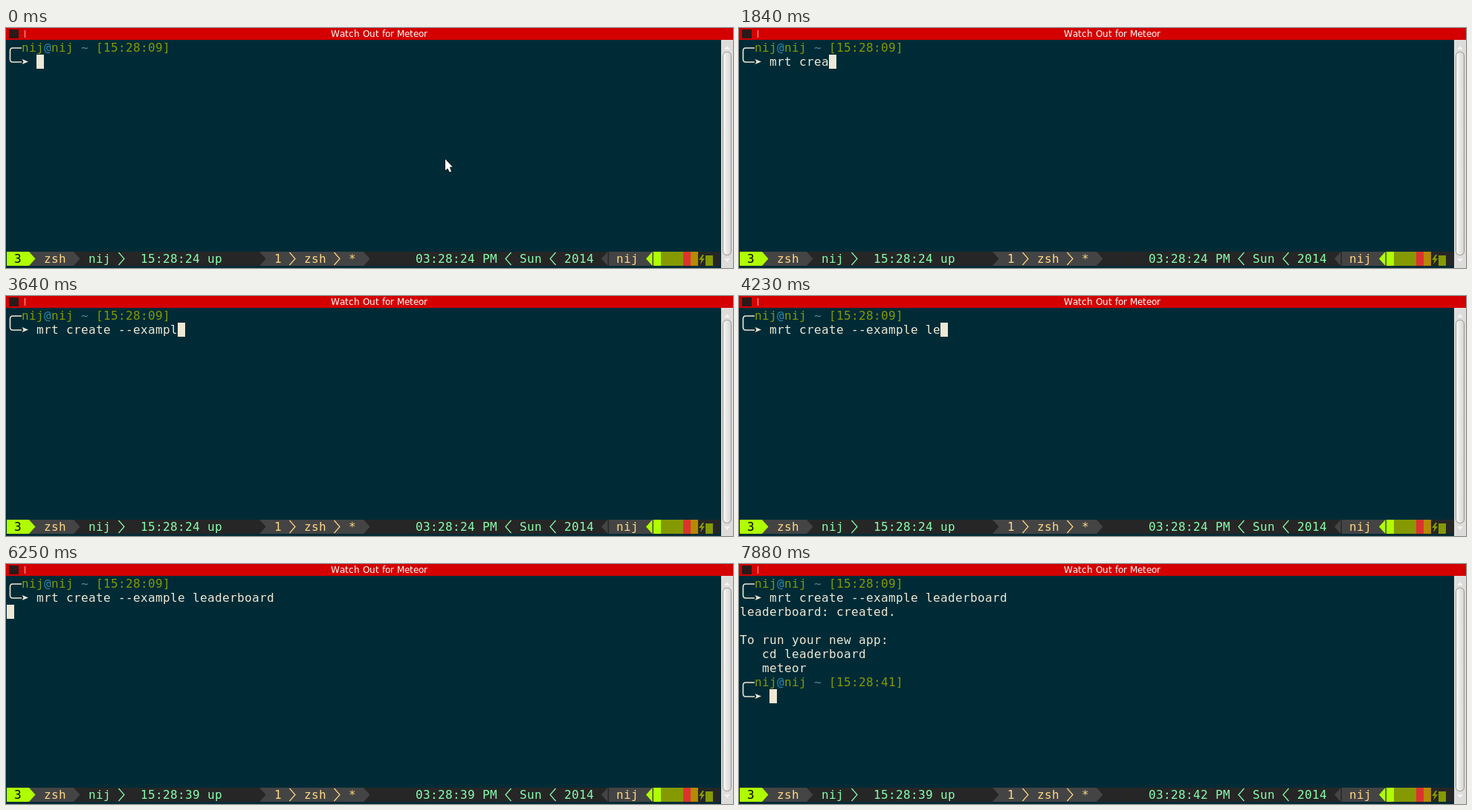
Recreate the animation shown at these times as an HTML page with a canvas. Size 978 by 324 pixels, loop 7.99 s.

```html
<!DOCTYPE html>
<html lang="en">
<head>
<meta charset="utf-8">
<title>Terminal</title>
<style>
html, body { margin: 0; width: 100%; height: 100%; overflow: hidden; background: #002b36; }
canvas { display: block; }
</style>
</head>
<body>
<canvas id="stage" width="978" height="324"></canvas>
<script>
const ctx = document.getElementById('stage').getContext('2d');
const LOOP = 7990, CELL = 10, LINE = 19, STATUS = 15;
const USER = 'nij';
const COMMAND = 'mrt create --example leaderboard';
const CREAM = '#eee8d5', OLIVE = '#859900', BLUE = '#2a89b0', SLATE = '#4a8a9a';
const LIME = '#afff00', GREY = '#444444', DARK = '#262626', TAN = '#ffd787', MINT = '#87ffaf';

// Bursts of typing: first key, last key, number of keys
const BURSTS = [
  [170, 170, 1], [650, 1210, 4], [1440, 1550, 2], [1730, 2100, 4], [2580, 2580, 1],
  [2730, 3480, 6], [3640, 3720, 2], [3848, 4360, 5], [5050, 5170, 2], [5440, 6090, 5]
];
const KEYS = BURSTS.flatMap(([from, to, n]) =>
  Array.from({ length: n }, (_, i) => from + (n > 1 ? (to - from) * i / (n - 1) : 0)));
const CLOCK = 4930, ENTER = 6250, RUNNING = 6350, HIDE = 6810, OUTPUT = 7410,
      PROMPT = 7510, READY = 7610, DONE = 7880;

const px = col => 1 + col * CELL;
const py = row => 17 + row * LINE;

function rect(x, y, w, h, color) {
  ctx.fillStyle = color;
  ctx.fillRect(x, y, w, h);
}

function cells(col, row, n, color) {
  rect(px(col), py(row), n * CELL, LINE, color);
}

function text(str, col, row, color) {
  ctx.font = '16px "DejaVu Sans Mono", monospace';
  ctx.fillStyle = color;
  [...str].forEach((ch, i) => ctx.fillText(ch, px(col + i), py(row) + 15));
}

function shape(d, fill, stroke, width = 1) {
  const path = new Path2D(d);
  if (fill) { ctx.fillStyle = fill; ctx.fill(path); }
  if (stroke) { ctx.strokeStyle = stroke; ctx.lineWidth = width; ctx.stroke(path); }
}

// Status bar separators, a little narrower than a cell; dir is 1 for right, -1 for left
function wedge(col, color, dir) {
  const x = px(col) + (dir > 0 ? 0 : 8.5), y = py(STATUS);
  shape(`M${x} ${y}l${dir * 8.5} 9.5l${-dir * 8.5} 9.5z`, color);
}

function chevron(col, color, dir) {
  const x = px(col) + (dir > 0 ? .5 : 8.5), y = py(STATUS);
  shape(`M${x} ${y + 1}l${dir * 7.5} 8.5l${-dir * 7.5} 8.5`, null, color, 1.2);
}

function prompt(row, time) {
  const y = py(row);
  shape(`M21 ${y + 10}H9Q5.5 ${y + 10} 5.5 ${y + 14}V${y + 25}Q5.5 ${y + 29} 9 ${y + 29}H21`, null, CREAM, 1.6);
  shape(`M21.5 ${y + 25}L30 ${y + 28.5}L21.5 ${y + 32}L23.5 ${y + 28.5}z`, CREAM);
  text(USER, 2, row, OLIVE);
  text('@', 5, row, BLUE);
  text(USER, 6, row, OLIVE);
  text('~', 10, row, SLATE);
  text(`[${time}]`, 12, row, OLIVE);
}

function titleBar() {
  rect(0, 0, 978, 16, '#d40000');
  rect(4, 2, 13, 12, '#2b1a1a');
  rect(25, 3, 1, 10, '#f4b0b0');
  ctx.font = '12px "DejaVu Sans", sans-serif';
  ctx.fillStyle = '#fff';
  let x = 437;
  for (const ch of 'Watch Out for Meteor') {
    ctx.fillText(ch, x, 12);
    x += Math.round(ctx.measureText(ch).width);
  }
}

function scrollbar() {
  rect(962, 16, 16, 308, '#dedcda');
  shape('M966 29l4 -5l4 5z', '#f3f2f1');
  shape('M966 311l4 5l4 -5z', '#f3f2f1');
  const shade = ctx.createLinearGradient(964, 0, 977, 0);
  shade.addColorStop(0, '#fafafa');
  shade.addColorStop(1, '#d2d0ce');
  ctx.beginPath();
  ctx.roundRect(964.5, 32.5, 11, 274, 5);
  ctx.fillStyle = shade;
  ctx.fill();
  ctx.strokeStyle = '#96938f';
  ctx.lineWidth = 1;
  ctx.stroke();
}

function statusBar(t) {
  const name = t >= RUNNING && t < DONE ? 'node' : 'zsh';
  const shift = name.length - 3;
  const put = (str, col, color) => text(str, col, STATUS, color);
  cells(0, STATUS, 96, DARK);

  cells(3, STATUS, 6 + shift, GREY);
  cells(0, STATUS, 3, LIME);
  wedge(3, LIME, 1);
  wedge(9 + shift, GREY, 1);
  put('3', 1, '#000');
  put(name, 5, TAN);
  put(USER, 11 + shift, MINT);
  chevron(15 + shift, MINT, 1);
  put(`15:28:${t < CLOCK ? 24 : 39} up`, 18 + shift, MINT);

  cells(34, STATUS, 14 + shift, GREY);
  wedge(34, DARK, 1);
  wedge(48 + shift, GREY, 1);
  put('1', 36, TAN);
  chevron(38, TAN, 1);
  put(name, 40, TAN);
  chevron(44 + shift, TAN, 1);
  put('*', 46 + shift, TAN);

  const sec = t < CLOCK ? 24 : t < RUNNING ? 39 : t < DONE ? 40 : 42;
  put(`03:28:${sec} PM`, 55, MINT);
  chevron(67, MINT, -1);
  put('Sun', 69, MINT);
  chevron(73, MINT, -1);
  put('2014', 75, MINT);
  wedge(80, GREY, -1);
  cells(81, STATUS, 6, GREY);
  put(USER, 82, TAN);

  wedge(86, LIME, -1);
  cells(87, STATUS, 1, LIME);
  cells(88, STATUS, 3, OLIVE);
  cells(91, STATUS, 1, '#dc322f');
  cells(92, STATUS, 1, '#b58900');
  shape('M937 306L932 313H935.5L934 319L940 311H936.5L939 306z', OLIVE);
  rect(941, 307, 10, 14, OLIVE);
}

function cursor(t, typed) {
  if (t >= HIDE && t < OUTPUT) return;
  let col = 4 + typed, row = 1;
  if (t >= READY) [col, row] = [4, 8];
  else if (t >= PROMPT) [col, row] = [0, 8];
  else if (t >= OUTPUT) [col, row] = [0, 7];
  else if (t >= ENTER) [col, row] = [0, 2];
  cells(col, row, 1, CREAM);
}

function draw(t) {
  const typed = KEYS.filter(k => t >= k).length;
  rect(0, 0, 978, 324, '#002b36');
  prompt(0, '15:28:09');
  text(COMMAND.slice(0, typed), 4, 1, CREAM);
  if (t >= OUTPUT) {
    text('leaderboard: created.', 0, 2, CREAM);
    text('To run your new app:', 0, 4, CREAM);
    text('cd leaderboard', 3, 5, CREAM);
    text('meteor', 3, 6, CREAM);
  }
  if (t >= PROMPT) prompt(7, '15:28:41');
  cursor(t, typed);
  statusBar(t);
  titleBar();
  scrollbar();
  if (t < KEYS[0])
    shape('M590.5 176V193L594 190L596.5 195L599.5 194L597.5 188H601.5z', '#fff', '#000', .8);
}

const start = performance.now();
function tick() {
  draw((performance.now() - start) % LOOP);
  requestAnimationFrame(tick);
}
tick();
</script>
</body>
</html>
```
